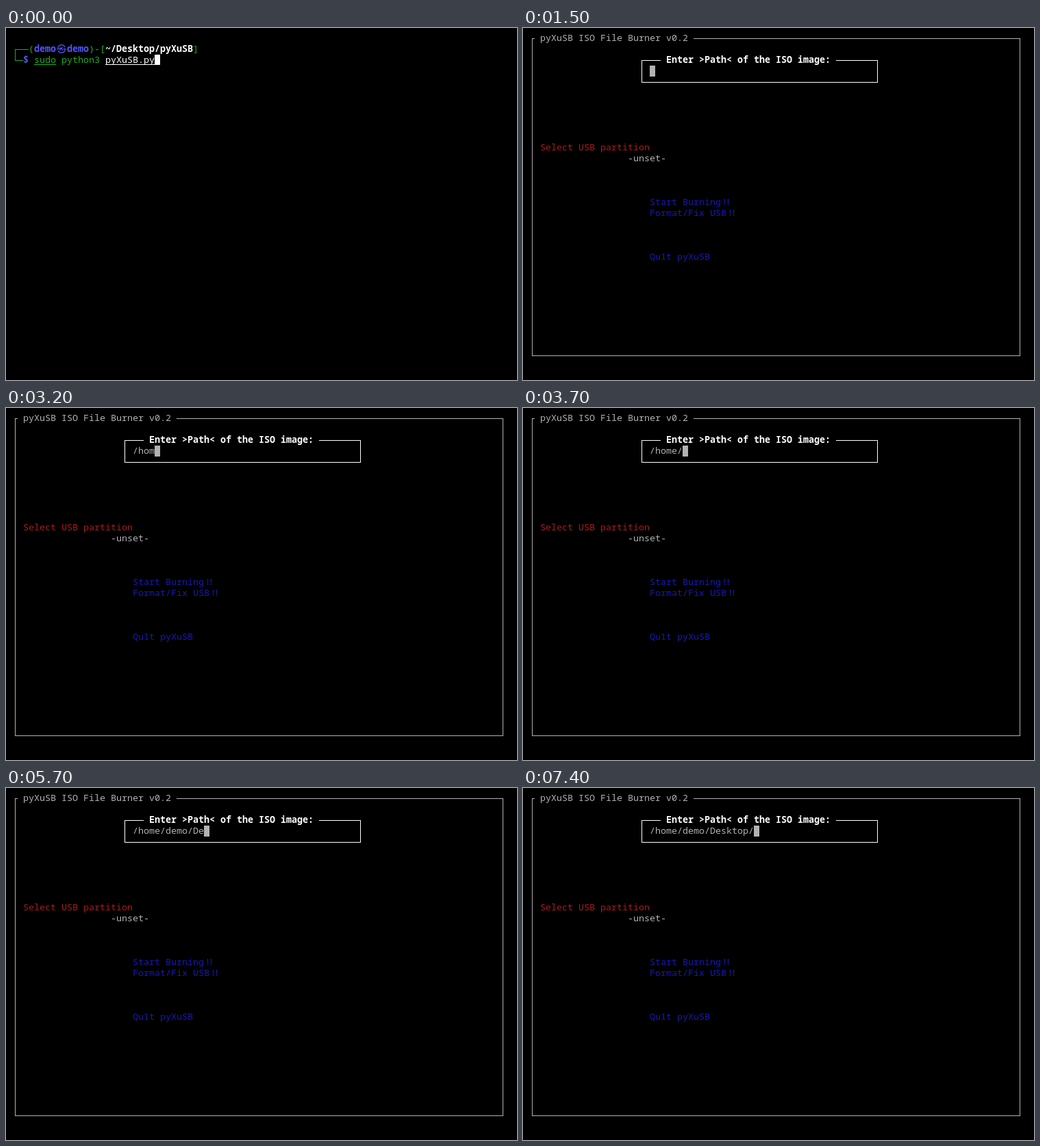
Write an HTML page with a canvas that moves like this. It is 746 px wide and 515 px high and loops after 8000 ms.

```html
<!DOCTYPE html>
<html lang="en">
<head>
<meta charset="utf-8">
<title>Terminal session</title>
<style>
  html, body { margin: 0; width: 100%; height: 100%; overflow: hidden; background: #000; }
  canvas { display: block; }
</style>
</head>
<body>
<canvas id="stage" width="746" height="515"></canvas>
<script>
const ctx = document.getElementById('stage').getContext('2d');
const LOOP = 8000, RUN_AT = 1300, MENU_AT = 1500;
const CELL_W = 8, CELL_H = 16, LEFT = 9, TOP = 7;
const WHITE = '#ffffff', GRAY = '#b2b2b2', GREEN = '#18b218',
      RED = '#b21818', BLUE = '#1818b2', BRIGHT_BLUE = '#5454ff';
const FAMILY = '"Noto Sans Mono", "DejaVu Sans Mono", monospace';

const PATH = '/home/demo/Desktop/';
// [time in ms, number of characters typed by then]
const KEYS = [[2400, 1], [2800, 2], [3000, 3], [3200, 4], [3400, 5], [3700, 6],
  [4000, 7], [4100, 8], [4300, 10], [5000, 11], [5300, 12], [5700, 13],
  [5800, 14], [6000, 15], [6300, 16], [6500, 18], [7400, 19]];

const cellX = col => LEFT + col * CELL_W;
const cellY = row => TOP + row * CELL_H;

function fill(x, y, w, h, color) {
  ctx.fillStyle = color;
  ctx.fillRect(x, y, w, h);
}

function text(str, col, row, color, bold = false) {
  ctx.font = `${bold ? 'bold ' : ''}13.333px ${FAMILY}`;
  ctx.fillStyle = color;
  [...str].forEach((ch, i) => ctx.fillText(ch, cellX(col + i), cellY(row) + 12));
}

function underlined(str, col, row, color) {
  text(str, col, row, color);
  fill(cellX(col), cellY(row) + 14, str.length * CELL_W, 1, color);
}

// The two exclamation marks sit closer together than their cells.
function exclaimed(str, col, row, color) {
  text(str, col, row, color);
  const end = col + str.length;
  text('!', end + 0.2, row, color);
  text('!', end + 0.8, row, color);
}

function cursor(col, row, height, color) {
  fill(cellX(col), cellY(row), CELL_W, height, color);
}

// Box lines run through cell centres; the title interrupts the top edge.
function titledBox(col, row, endCol, endRow, title, titleCol, color, bold) {
  const x = cellX(col) + 4, y = cellY(row) + 8;
  const right = cellX(endCol) + 4, bottom = cellY(endRow) + 8;
  const gapStart = cellX(titleCol - 1), gapEnd = cellX(titleCol + title.length + 1);
  fill(x, y, gapStart - x, 1, color);
  fill(gapEnd, y, right - gapEnd + 1, 1, color);
  fill(x, y, 1, bottom - y + 1, color);
  fill(right, y, 1, bottom - y + 1, color);
  fill(x, bottom, right - x + 1, 1, color);
  text(title, titleCol, row, color, bold);
}

function drawShell(running) {
  fill(13, 31, 20, 1, GREEN);
  fill(13, 31, 1, 17, GREEN);
  fill(13, 47, 12, 1, GREEN);

  text('(', 3, 1, GREEN);
  text('demo', 4, 1, BRIGHT_BLUE, true);
  ctx.font = 'bold 13px "Noto Sans CJK KR", "Noto Sans CJK JP", "Noto Sans CJK", sans-serif';
  ctx.textAlign = 'center';
  ctx.fillText('㉿', cellX(9), cellY(1) + 12);
  ctx.textAlign = 'left';
  text('demo', 10, 1, BRIGHT_BLUE, true);
  text(')-[', 14, 1, GREEN);
  text('~/Desktop/pyXuSB', 17, 1, WHITE, true);
  text(']', 33, 1, GREEN);

  text('$', 2, 2, BRIGHT_BLUE, true);
  underlined('sudo', 4, 2, GREEN);
  text('python3', 9, 2, GREEN);
  underlined('pyXuSB.py', 17, 2, WHITE);
  if (running) cursor(0, 3, 15, WHITE);
  else cursor(26, 2, 15, WHITE);
}

function drawMenu(time) {
  titledBox(0, 0, 89, 29, 'pyXuSB ISO File Burner v0.2', 2, GRAY, false);
  titledBox(20, 2, 63, 4, 'Enter >Path< of the ISO image:', 25, WHITE, true);

  const typed = KEYS.reduce((n, [at, count]) => time >= at ? count : n, 0);
  text(PATH.slice(0, typed), 22, 3, GRAY);
  cursor(22 + typed, 3, 16, GRAY);

  text('Select USB partition', 2, 10, RED);
  text('-unset-', 18, 11, GRAY);
  exclaimed('Start Burning', 22, 15, BLUE);
  exclaimed('Format/Fix USB', 22, 16, BLUE);
  text('Qu1t pyXuSB', 22, 20, BLUE);
}

function render(now) {
  const time = now % LOOP;
  fill(0, 0, 746, 515, '#000');
  if (time < MENU_AT) drawShell(time >= RUN_AT);
  else drawMenu(time);
}

const start = performance.now();
function tick() {
  render(performance.now() - start);
  requestAnimationFrame(tick);
}
tick();
</script>
</body>
</html>
```
